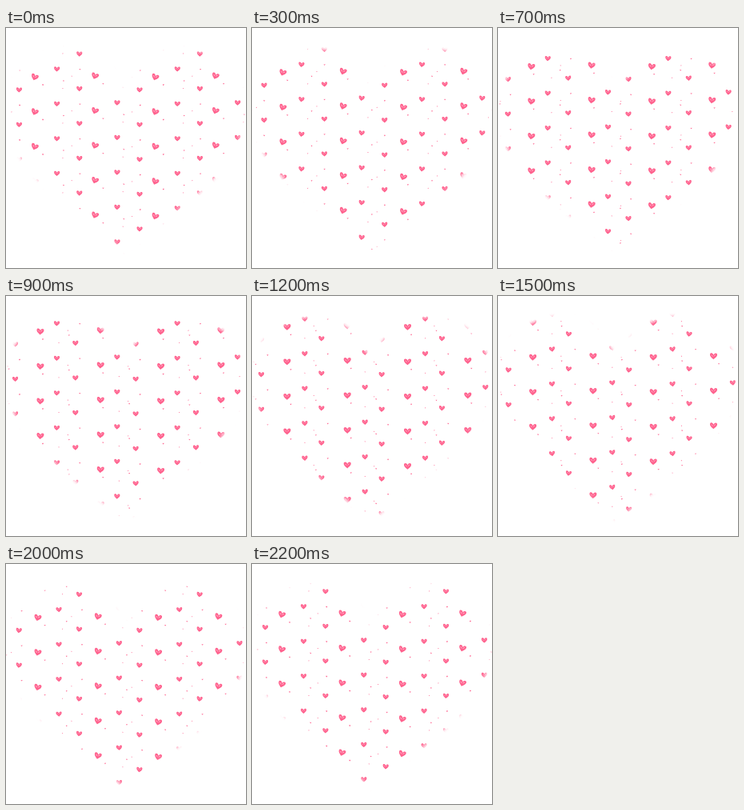
An HTML page with a canvas that plays this animation: 300x300 px, repeating every 2300 ms.

```html
<!DOCTYPE html>
<html>
<head>
<meta charset="utf-8">
<style>
html, body { margin: 0; width: 100%; height: 100%; overflow: hidden; background: #fff; }
canvas { display: block; width: 300px; height: 300px; }
</style>
</head>
<body>
<canvas id="stage" width="300" height="300"></canvas>
<script>
const ctx = document.getElementById('stage').getContext('2d');
const LOOP = 2300, STEP = 100, TILE_W = 75.3, TILE_H = 43.5;

// Sways over one loop, u from 0 to 1: sideways position and tilt in radians
const wave = (u, peak) => Math.cos(2 * Math.PI * (u - peak));
const large = u => ({
  x: 36 + 7.8 * (Math.sin(Math.PI * u) - 0.1 * Math.sin(2 * Math.PI * u)),
  tilt: 0.17 + 0.17 * wave(u, 0.05)
});
const right = u => ({ x: 64.6 + 3.1 * wave(u, 0.7), tilt: -0.13 * wave(u, 0.7) });
const left = u => ({ x: 13.9 + 2.6 * wave(u, 0.96), tilt: 0.05 + 0.14 * wave(u, 0.75) });

// The hearts and specks of one tile
const parts = [
  { sway: large, dx: 0, y: 61, size: 9 },
  { sway: right, dx: 0, y: 51, size: 7.2 },
  { sway: left, dx: 0, y: 77, size: 7.2 },
  { sway: right, dx: -46.5, y: 53, size: 1.8 },
  { sway: right, dx: -17.5, y: 71, size: 1.8 },
  { sway: large, dx: 36, y: 66, size: 1.7 },
  { sway: left, dx: -9.5, y: 61.5, size: 1.2 },
  { sway: left, dx: 54.5, y: 75.5, size: 1.2 }
];

// Big heart: one half and its mirror image
const half = new Path2D('M149.5 85C138 50 112 26 78 26C33 26 0 60 0 103' +
  'C0 178 90 229 149.5 280Z');
const mask = new Path2D(half);
mask.addPath(half, new DOMMatrix([-1, 0, 0, 1, 299, 0]));

// Little heart one unit wide, with a scribbled highlight
const heart = new Path2D('M0 .5C-.2 .3 -.5 .15 -.5 -.15C-.5 -.45 -.12 -.45 0 -.1' +
  'C.12 -.45 .5 -.45 .5 -.15C.5 .15 .2 .3 0 .5Z');
const scribble = new Path2D('M-.3 -.12L-.1 .1M.05 .05L.27 -.15');

function drawHeart(x, y, size, tilt) {
  ctx.save();
  ctx.translate(x, y);
  ctx.rotate(tilt);
  ctx.scale(size, size);
  ctx.fillStyle = '#ff628e';
  ctx.fill(heart);
  if (size > 4) {
    ctx.lineWidth = 0.1;
    ctx.strokeStyle = '#ffb4ca';
    ctx.stroke(scribble);
  }
  ctx.restore();
}

function draw(u) {
  ctx.clearRect(0, 0, 300, 300);
  for (const { sway, dx, y, size } of parts) {
    const { x, tilt } = sway(u);
    for (let col = -1; col < 4; col++) {
      const shift = col % 2 ? -1.4 : 0;
      for (let row = -2; row < 7; row++) {
        drawHeart(x + dx + col * TILE_W, y + shift + (row - u) * TILE_H, size, tilt);
      }
    }
  }
  ctx.save();
  ctx.globalCompositeOperation = 'destination-in';
  ctx.filter = 'blur(2px)';
  ctx.fill(mask);
  ctx.restore();
}

const start = performance.now();
function tick() {
  const t = (performance.now() - start) % LOOP;
  draw(Math.floor(t / STEP) * STEP / LOOP);
  requestAnimationFrame(tick);
}
tick();
</script>
</body>
</html>
```
